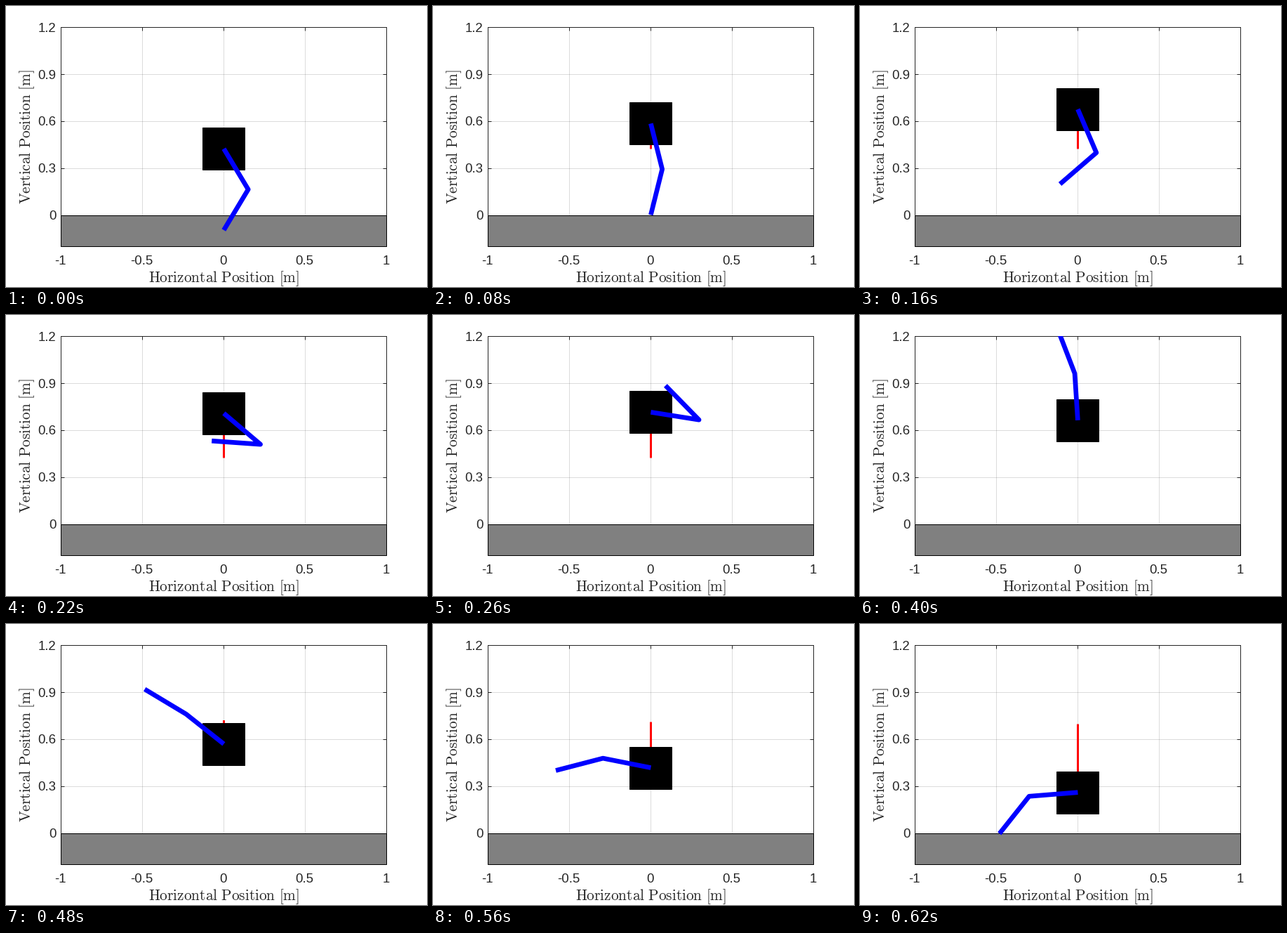
Animation of 600 by 400 pixels, one loop 0.95 s. Source, as a matplotlib script:

```python
import numpy as np
import matplotlib.pyplot as plt
from matplotlib.animation import FuncAnimation
from matplotlib.patches import Rectangle

plt.rcParams["mathtext.fontset"] = "cm"

W, H, DPI = 600, 400, 100
PX = 72 / DPI                  # one pixel in points
LEFT, RIGHT, TOP, BOTTOM = 78.4, 542.4, 30.4, 342.4
INK = "#262626"
LINK = 0.3                     # length of each leg segment, m
BODY_W, BODY_H = .258, .269
APEX, APEX_TIME = .716, 270    # highest hip position, m and ms
STEP, LAND, LOOP = 20, 620, 950
TICK = 10                      # ms per drawn frame
TAIL = 270                     # ms of path kept behind the body

# key poses: time in ms, thigh and shank angle in degrees from straight down
POSES = np.array([(0, 30, -30), (80, 13.5, -13.5), (220, 48.6, -94.2),
                  (320, 134.5, -188.7), (400, 183.6, -159.7),
                  (480, 230.5, -122), (620, 274.8, -37.4)])
TIMES, ANGLES = POSES[:, 0], POSES[:, 1:]
SPEEDS = np.gradient(ANGLES, TIMES, axis=0)


def hip_height(t):
    """Arc that steepens away from the apex, more so during push-off."""
    d = (np.asarray(t) - APEX_TIME) / 1000
    return APEX - d ** 2 * (2.7 + np.where(d < 0, 4.8, 2.9) * np.abs(d))


def leg_angles(t):
    """Cubic Hermite curve through the key poses."""
    i = np.clip(np.searchsorted(TIMES, t, side="right") - 1, 0, len(TIMES) - 2)
    h = TIMES[i + 1] - TIMES[i]
    u = (t - TIMES[i]) / h
    v = 1 - u
    return np.radians((1 + 2 * u) * v * v * ANGLES[i] + u * v * v * h * SPEEDS[i]
                      + (1 + 2 * v) * u * u * ANGLES[i + 1]
                      - u * u * v * h * SPEEDS[i + 1])


def leg_points(t):
    """Hip, knee and foot."""
    angles = leg_angles(t)
    xs = np.append(0, np.cumsum(LINK * np.sin(angles)))
    ys = hip_height(t) - np.append(0, np.cumsum(LINK * np.cos(angles)))
    return xs, ys


fig = plt.figure(figsize=(W / DPI, H / DPI), dpi=DPI, facecolor="white")
ax = fig.add_axes([LEFT / W, 1 - BOTTOM / H, (RIGHT - LEFT) / W, (BOTTOM - TOP) / H])
ax.set(xlim=(-1, 1), ylim=(-.2, 1.2),
       xticks=np.arange(-2, 3) * .5, yticks=np.arange(5) * .3)
ax.set_axisbelow(True)
ax.grid(color=INK, alpha=.16, linewidth=PX)
ax.tick_params(direction="in", length=4.6 * PX, width=PX, color=INK,
               top=True, right=True, labelbottom=False, labelleft=False)
for spine in ax.spines.values():
    spine.set(linewidth=PX, color=INK, zorder=1)


def label(x, y, text, size=18.7, ha="center", **kw):
    """Text at a pixel position measured from the top left."""
    fig.text(x / W, 1 - y / H, text, fontsize=size * PX, color=INK,
             ha=ha, va="baseline", family="Liberation Sans", **kw)


for v in ax.get_xticks():
    label(309.7 + v * (RIGHT - LEFT) / 2, 368, f"{v:g}")
for v in ax.get_yticks():
    label(71.3, 304.2 - v * (BOTTOM - TOP) / 1.4, f"{v:g}", ha="right")
label(310.5, 393, r"$\mathrm{Horizontal\ Position\ [m]}$", 21.3)
label(35, 186.5, r"$\mathrm{Vertical\ Position\ [m]}$", 21.3,
      rotation=90, rotation_mode="anchor")

ax.add_patch(Rectangle((-1, -.2), 2, .2, facecolor="#808080", edgecolor="black",
                       linewidth=PX, zorder=2, clip_on=False))
trail, = ax.plot([], [], color="red", linewidth=3 * PX, zorder=3,
                 solid_capstyle="butt")
body = ax.add_patch(Rectangle((-BODY_W / 2, 0), BODY_W, BODY_H, facecolor="black",
                              edgecolor="black", linewidth=PX, zorder=4))
leg, = ax.plot([], [], color="blue", linewidth=6.7 * PX, zorder=5,
               solid_capstyle="butt", solid_joinstyle="round")


def draw(frame):
    t = min(frame * TICK // STEP * STEP, LAND)
    xs, ys = leg_points(t)
    leg.set_data(xs, ys)
    body.set_y(ys[0] - BODY_H / 2)
    path = hip_height(np.arange(max(0, t - TAIL), t + 1, STEP))
    trail.set_data(np.zeros(len(path)), path)
    return trail, body, leg


anim = FuncAnimation(fig, draw, frames=LOOP // TICK, interval=TICK,
                     repeat=True, repeat_delay=0, blit=False)
plt.show()
```
